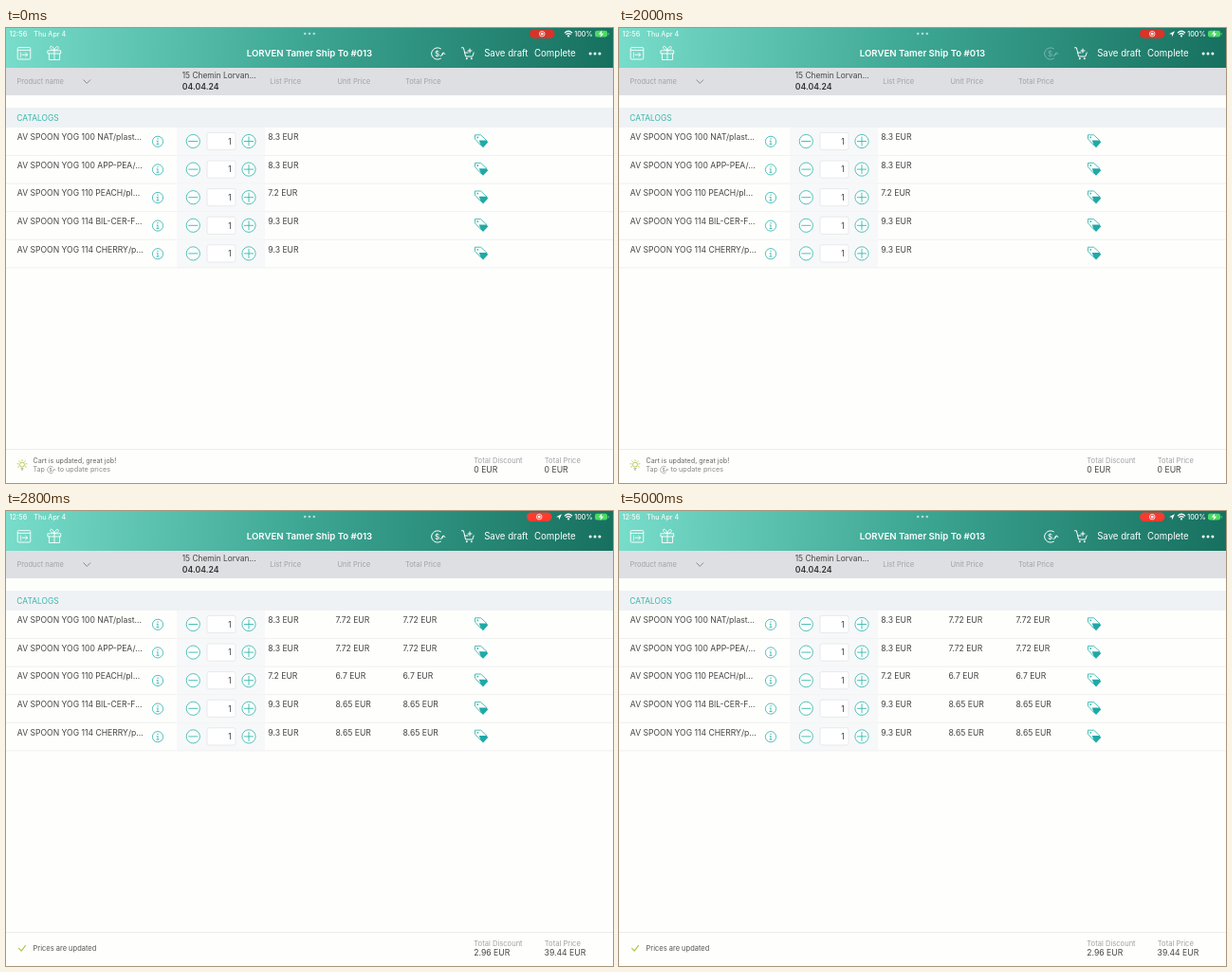
Animation of 640 by 480 pixels, one loop 5200 ms. Source, as an HTML page:

```html
<!DOCTYPE html>
<html lang="en">
<head>
<meta charset="utf-8">
<title>Order prices</title>
<style>
  html, body { margin: 0; width: 100%; height: 100%; overflow: hidden; background: #fefefd; }
  svg { display: block; width: 640px; height: 480px; font-family: Inter, Roboto, sans-serif; }
  text { white-space: pre; }
  .line { fill: none; stroke-linecap: round; stroke-linejoin: round; }
</style>
</head>
<body>
<svg id="stage" viewBox="0 0 640 480" xmlns="http://www.w3.org/2000/svg"></svg>
<script>
const LOOP = 5200, STEP = 200;
const TEAL = '#35b8ae', DARK = '#454545', MUTED = '#a2a2a6', OLIVE = '#b4c348';
const PRESS = 2000, LOAD_START = 2200, LOAD_END = 2800;
const SWIPE_START = 3400, SWIPE_END = 4000;

const products = [
  ['AV SPOON YOG 100 NAT/plast...', '8.3', '7.72'],
  ['AV SPOON YOG 100 APP-PEA/...', '8.3', '7.72'],
  ['AV SPOON YOG 110 PEACH/pl...', '7.2', '6.7'],
  ['AV SPOON YOG 114 BIL-CER-F...', '9.3', '8.65'],
  ['AV SPOON YOG 114 CHERRY/p...', '9.3', '8.65']
];

const text = (x, y, value, size, fill, attrs = '') =>
  `<text x="${x}" y="${y}" font-size="${size}" fill="${fill}" ${attrs}>${value}</text>`;
const rect = (x, y, w, h, fill, attrs = '') =>
  `<rect x="${x}" y="${y}" width="${w}" height="${h}" fill="${fill}" ${attrs}/>`;
const circle = (x, y, r, fill, attrs = '') =>
  `<circle cx="${x}" cy="${y}" r="${r}" fill="${fill}" ${attrs}/>`;
const line = (d, stroke, width = 1, attrs = '') =>
  `<path class="line" d="${d}" stroke="${stroke}" stroke-width="${width}" ${attrs}/>`;
const group = (id, content, attrs = '') => `<g id="${id}" ${attrs}>${content}</g>`;
const dots = (x, y, gap, r, opacity) =>
  [-1, 0, 1].map(i => circle(x + i * gap, y, r, '#fff', `opacity="${opacity}"`)).join('');

const syncIcon = color =>
  line('M3.4 5.2A6.2 6.2 0 1 1 3.4 -5.2', color, 1) +
  line('M3 2.5Q5.8 2.5 6.2 -.5M4.6 .6L6.3 -1.2L7.8 .6', color, 1) +
  text(-.4, 2.9, '$', 8, color, 'text-anchor="middle" font-weight="500"');

const spinner = (inner, outer, width, color) => Array.from({ length: 8 }, (_, i) =>
  line(`M0 ${-inner}V${-outer}`, color, width,
    `transform="rotate(${i * 45})" opacity="${0.2 + 0.8 * (i / 7) ** 1.3}"`)).join('');

function statusBar() {
  return text(3.5, 8.6, '12:56', 7.3, '#fff', 'font-weight="500" opacity=".9"') +
    text(29.3, 8.6, 'Thu Apr 4', 7.1, '#fff', 'font-weight="500" opacity=".9"') +
    dots(320, 6, 4.8, 1.3, .6) +
    group('record', rect(549, 1.4, 26.5, 9.6, 'inherit', 'rx="4.8" id="pill"') +
      circle(562.2, 6.2, 2.8, 'none', 'stroke="#fff" stroke-width=".8"') +
      circle(562.2, 6.2, 1.4, '#fff')) +
    group('location', '<path d="M580 6.2L586 3.2L583.2 9.3L582.8 6.5Z" fill="#fff"/>') +
    line('M589.3 4.9Q593 1.6 596.7 4.9M590.9 6.6Q593 4.8 595.1 6.6', '#fff', 1.3) +
    circle(593, 8.4, 1.1, '#fff') +
    text(599.3, 8.7, '100%', 7.1, '#fff', 'font-weight="500"') +
    rect(621, 2.8, 13, 6.8, '#4cd964', 'rx="2"') +
    rect(634.7, 5, 1, 2.4, '#4cd964', 'rx=".5"') +
    '<path d="M628.3 2.4L624.8 6.6H627.2L626.5 10L630.2 5.7H627.8Z" fill="#fff"/>';
}

function header() {
  const exit = rect(12.2, 20.6, 13.6, 12.4, 'none', 'rx="1" stroke="#fff" stroke-width=".9"') +
    line('M12.5 23.4H25.5M17 28.2H22.5M20.8 26.4L22.7 28.2L20.8 30', '#fff', .9) +
    line('M15.4 26V31', '#fff', .7);
  const gift = line('M44.3 23.8H57.7V27H44.3ZM45.4 27V33.5H56.6V27M51 23.8V33.5' +
    'M51 23.5C45 23 46 18 48.5 19.5Q50.3 20.6 51 23.5C51.7 20.6 54.6 17.8 55.3 20.7Q55.3 23.4 51 23.5', '#fff', .9);
  const cart = line('M480.5 20.8H482.4L484.6 30H491.8L493.2 26M483.6 26H487', '#fff', 1) +
    line('M489 22V26M487 24H491', '#fff', 1) +
    circle(485.8, 32.3, 1, '#fff') + circle(490.8, 32.3, 1, '#fff');
  return rect(0, 0, 640, 42, 'url(#bar)') + exit + gift +
    text(320, 30.3, 'LORVEN Tamer Ship To #013', 9.6, '#fff', 'font-weight="600" text-anchor="middle"') +
    group('sync', syncIcon('#fff'), 'transform="translate(455 27)"') +
    cart +
    group('actions', text(504.2, 30.3, 'Save draft', 9.65, '#fff') + text(557, 30.3, 'Complete', 9.65, '#fff')) +
    dots(621, 27, 4.9, 1.5, 1);
}

function columnTitles() {
  const titles = [[11.5, 'Product name'], [278.3, 'List Price'], [349.5, 'Unit Price'], [421, 'Total Price']];
  return rect(0, 42, 640, 29, '#dedfe2') +
    titles.map(([x, label]) => text(x, 59, label, 7.5, MUTED)).join('') +
    line('M81.8 54.8L85.3 58.4L88.8 54.8', '#8b8b90', 1) +
    text(185.7, 53.3, '15 Chemin Lorvan...', 8.4, DARK) +
    text(185.7, 65.2, '04.04.24', 8.7, '#333', 'font-weight="600"') +
    rect(0, 84, 640, 21, '#eff2f4') +
    text(11.3, 97.8, 'CATALOGS', 8.45, TEAL);
}

function productRow([name, list, unit], i) {
  const ring = `stroke="${TEAL}" stroke-width=".85"`;
  const tag = line('M500.6 123.6L494.5 117V112.8H500.6L506.8 118.6', TEAL, .9, 'style="fill:#fff"') +
    '<path d="M498.8 118.6H506.8L508.2 120.6L503 126.2L500.6 123.6Z" fill="#20a9a6"/>' +
    circle(497.3, 115.4, .9, TEAL);
  return `<g transform="translate(0 ${i * 29.6})">` +
    rect(180, 105, 93, 29, '#f7f8f9') +
    rect(0, 134, 640, 1, '#f0f0f0') +
    text(11.8, 118.2, name, 8.6, DARK) +
    circle(160, 119.8, 5.6, '#fff', ring) +
    line('M160 119.3V122.6M159.1 119.3H160M158.9 122.7H161.1', TEAL, .8) +
    circle(160, 117, .7, TEAL) +
    circle(197.3, 119.5, 7.1, '#fff', ring) + circle(256, 119.5, 7.1, '#fff', ring) +
    line('M192.7 119.5H201.9M251.4 119.5H260.6M256 114.9V124.1', TEAL, .9) +
    rect(212, 110.4, 30, 18.2, '#fff', 'rx="2" stroke="#e8e9eb" stroke-width="1"') +
    text(237.8, 122.8, '1', 8.5, DARK, 'text-anchor="end"') +
    text(276.3, 118.2, `${list} EUR`, 8.6, DARK) +
    `<g class="priced">${[347.5, 418.5].map(x => text(x, 118.2, `${unit} EUR`, 8.6, DARK)).join('')}</g>` +
    tag + '</g>';
}

function footer() {
  const rays = [-120, -80, -40, 0, 40, 80, 120].map(a =>
    line('M0 -4V-5', OLIVE, .8, `transform="translate(17 460.6) rotate(${a})"`)).join('');
  const hint = circle(17, 460.6, 2.5, 'none', `stroke="${OLIVE}" stroke-width=".9"`) + rays +
    line('M16 464.7H18M16.3 466H17.7', '#9a9a70', .8) +
    text(28.5, 459, 'Cart is updated, great job!', 7.15, '#666') +
    text(28.5, 468.2, 'Tap', 7.15, '#888') +
    `<g transform="translate(47.3 466) scale(.6)">${syncIcon('#888')}</g>` +
    text(54.4, 468.2, 'to update prices', 7.25, '#888');
  const busy = group('smallSpinner', spinner(2.5, 4.6, 1.2, '#9cc5c0')) +
    text(28.5, 463.8, 'Calculating prices, please wait', 7.55, '#777');
  const done = line('M13.6 461.4L16.2 464.2L20.4 458.6', OLIVE, 1.2) +
    text(28.5, 463.8, 'Prices are updated', 7.5, '#555');
  return rect(0, 444, 640, 1, '#ededed') +
    group('hint', hint) + group('busy', busy) + group('done', done) +
    text(493.3, 458.6, 'Total Discount', 7.6, MUTED) +
    text(567.8, 458.6, 'Total Price', 7.6, MUTED) +
    text(493.3, 469.2, '', 8.65, DARK, 'id="discount"') +
    text(567.6, 469.2, '', 8.65, DARK, 'id="total"');
}

document.getElementById('stage').innerHTML =
  `<defs><linearGradient id="bar" gradientUnits="userSpaceOnUse" x1="0" y1="0" x2="640" y2="40">
    <stop offset="0" stop-color="#78ddca"/><stop offset=".5" stop-color="#3ca592"/>
    <stop offset="1" stop-color="#17705f"/></linearGradient></defs>` +
  rect(0, 0, 640, 480, '#fefefd') +
  header() + columnTitles() + products.map(productRow).join('') + footer() +
  group('loading', rect(0, 0, 640, 480, '#fff', 'opacity=".47"') +
    group('spinner', spinner(5, 9, 2.8, '#62cbc3'))) +
  statusBar() + group('trail', '');

const el = id => document.getElementById(id);
const show = (node, visible) => node.setAttribute('visibility', visible ? 'visible' : 'hidden');
const priced = document.querySelectorAll('.priced');

// Touch trail: samples of the finger's recent positions, shrinking with age.
function touchTrail(t) {
  if (t <= SWIPE_START || t >= SWIPE_END) return '';
  let marks = '';
  for (let age = 200; age >= 0; age -= 20) {
    const p = Math.min(1, Math.max(0, (t - age - SWIPE_START) / 200));
    marks += circle(489 + 47 * p, 458.5 + 1.5 * p, 11.5 * (1 - age / 220), '#ff2020',
      'fill-opacity=".42" stroke="#e81818" stroke-opacity=".45" stroke-width=".8"');
  }
  return marks;
}

function render(time) {
  const t = Math.floor(time % LOOP / STEP) * STEP;
  const loading = t >= LOAD_START && t < LOAD_END;
  const updated = t >= LOAD_END;
  const located = t >= 400;

  show(el('location'), located);
  el('record').setAttribute('transform', `translate(${located ? 0 : 3} 0)`);
  const glow = (1 - Math.cos(2 * Math.PI * t / 1900)) / 2;
  el('pill').setAttribute('fill', `rgb(${214 + 41 * glow},${52 + 7 * glow},${42 + 6 * glow})`);

  el('sync').setAttribute('opacity', loading ? .12 : t === PRESS ? .35 : 1);
  el('actions').setAttribute('opacity', loading ? .6 : 1);
  show(el('hint'), !loading && !updated);
  show(el('busy'), loading);
  show(el('done'), updated);
  show(el('loading'), loading);
  priced.forEach(node => show(node, updated));
  el('discount').textContent = updated ? '2.96 EUR' : '0 EUR';
  el('total').textContent = updated ? '39.44 EUR' : '0 EUR';

  const angle = 270 + Math.floor((t - LOAD_START) / 100) * 45;
  el('spinner').setAttribute('transform', `translate(319.5 239) rotate(${angle})`);
  el('smallSpinner').setAttribute('transform', `translate(17 461.5) rotate(${angle})`);
  el('trail').innerHTML = touchTrail(t);
}

const start = performance.now();
function tick() {
  render(performance.now() - start);
  requestAnimationFrame(tick);
}
tick();
</script>
</body>
</html>
```
